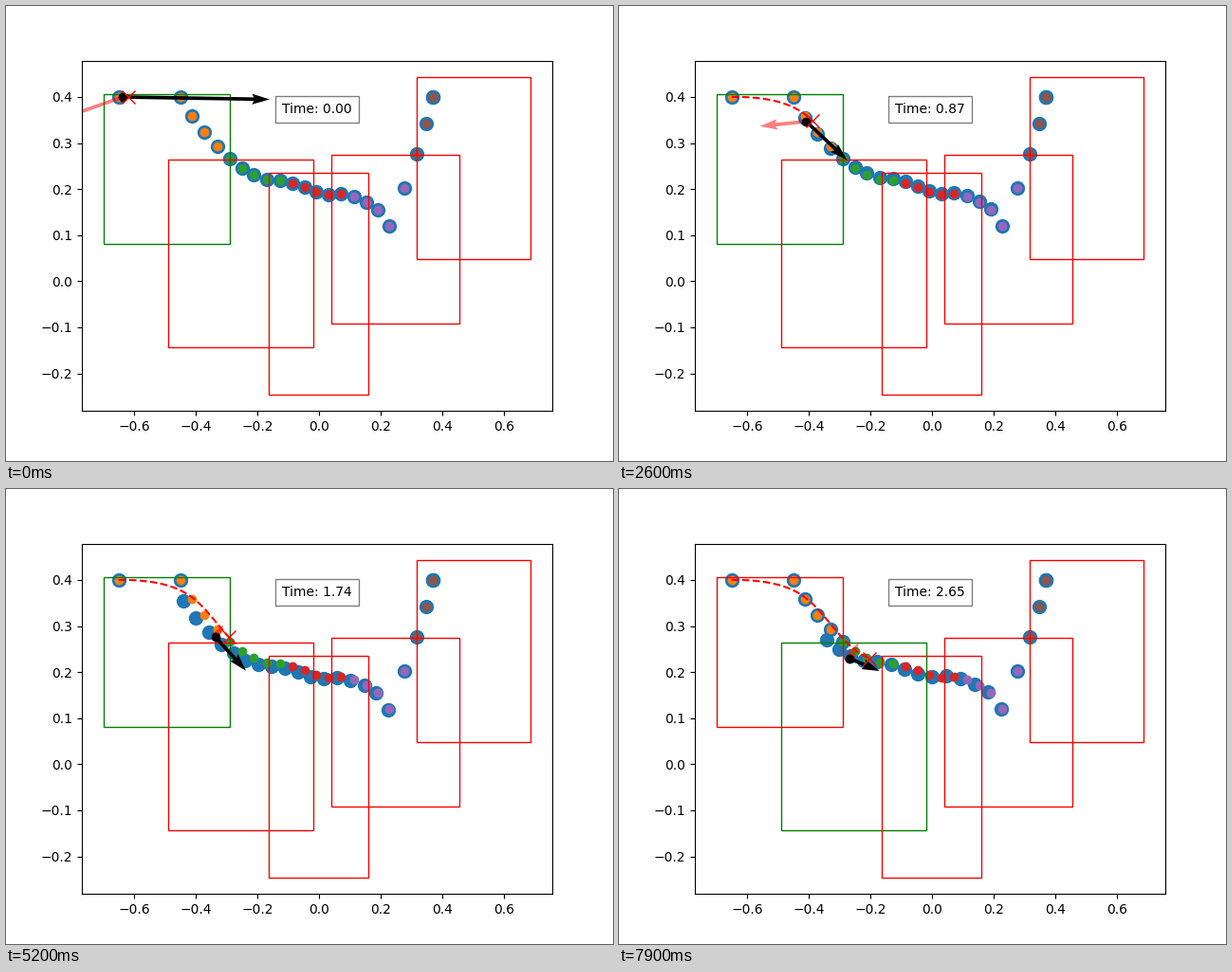
Recreate the animation shown at these times as a matplotlib script. Size 640 by 480 pixels, loop 8000 ms.

```python
import numpy as np
import matplotlib.pyplot as plt
from matplotlib.animation import FuncAnimation
from matplotlib.patches import Rectangle

FRAMES, STEP_MS = 80, 100
DT = 0.0335          # simulated seconds per frame
SWITCH_TIME = 2.0    # when the second region becomes active
ORIGIN = np.array([330.0, 290.36])
SCALE = np.array([324.9, -486.1])


def to_data(points):
    """Stage pixels to axes coordinates."""
    return (np.asarray(points, float) - ORIGIN) / SCALE


def smooth(t, keys, values):
    """Cubic curve through a few key points."""
    keys, values = np.array(keys, float), np.array(values, float)
    slopes = np.gradient(values, keys, axis=0, edge_order=2)
    i = np.clip(np.searchsorted(keys, t, side="right") - 1, 0, len(keys) - 2)
    h = (keys[i + 1] - keys[i])[:, None]
    u = (t - keys[i])[:, None] / h
    return ((1 + 2 * u) * (1 - u) ** 2 * values[i] + u * (1 - u) ** 2 * h * slopes[i]
            + u * u * (3 - 2 * u) * values[i + 1] + u * u * (u - 1) * h * slopes[i + 1])


# Waypoints: a start, a falling arm, a rising arm and a resting end
START, SECOND, END = (118.8, 95.93), (183.8, 95.93), (450.2, 95.93)
VALLEY = (404.3, 232.3)
falling = smooth(np.arange(1, 18), [1, 3, 5, 7, 10, 13, 14, 16, 17, 18],
                 [SECOND, (209.3, 133), (236, 161), (261.3, 178.3), (302.3, 186.8),
                  (340, 198.7), (353.3, 197.8), (380.3, 206.5), (392, 214.5), VALLEY])
rising = smooth(np.arange(18, 22), [18, 20, 22], [VALLEY, (433.3, 156.3), END])
waypoints = np.vstack([START, falling, rising, END, END, END])

# Motion in stage pixels
t = np.arange(FRAMES) * STEP_MS / 1000
velocity = np.column_stack([32 + 123 * np.exp(-(t / 1.29) ** 1.25),
                            2.5 + 39.5 * np.sin(np.pi * (t / 9) ** 0.7)])
steps = (velocity[1:] + velocity[:-1]) / 2 * DT
goal = np.array([129.5, 96]) + np.vstack([(0, 0), np.cumsum(steps, axis=0)])

drift = np.interp(t, [3.8, 5.2, 7.9], [0, 9, 17])
swing = np.interp(t, [1.6, 2.6, 4.0, 5.2], [0, -2, 5, 0])
lift = np.interp(t, [4.0, 5.2, 6.3, 7.9], [0, 2.5, 3, -2])
body = goal - np.column_stack([6.4 + 0.85 * drift, swing / 2])

FORCE_KEYS = [0, 2.6, 4.0, 6.3, 7.9]
force = np.column_stack([np.interp(t, FORCE_KEYS, [-171, -49, 0, 17, 10]),
                         np.interp(t, FORCE_KEYS, [60, 5, 0, -24, -17])])

body, goal, start = to_data(body), to_data(goal), to_data(START)
velocity, force = velocity / SCALE, force / SCALE


def plan(i, switched):
    """Waypoints pulled along by the body, less so further down the path."""
    index = np.arange(len(waypoints))
    fade = np.clip((19 - index) / 10, 0, 1) * (index > 1)
    bend = swing[i] * np.tanh((index - 5) / 1.2) + lift[i]
    points = waypoints + np.column_stack([-drift[i] * fade, bend * fade])
    if switched:
        points = np.vstack([waypoints[:6], points[5:]])
    return to_data(points)


fig, ax = plt.subplots(figsize=(6.4, 4.8), dpi=100)
ax.set_xlim(-0.7694, 0.7574)
ax.set_ylim(-0.28154, 0.47886)

plan_dots = ax.scatter(*plan(0, False).T, s=100, color="C0")
for k, group in enumerate(np.split(to_data(waypoints), 5)):
    ax.scatter(*group.T, s=36, color=f"C{k + 1}")

# left, top, right, bottom
REGIONS = [(103.5, 92.5, 236.5, 251.5), (171.5, 161.5, 324.5, 360.5),
           (277.5, 175.5, 382.5, 410.5), (343.5, 156.5, 478.5, 335.5),
           (433.5, 74.5, 553.5, 267.5)]
boxes = []
for left, top, right, bottom in REGIONS:
    corner = to_data((left, bottom))
    size = to_data((right, top)) - corner
    boxes.append(ax.add_patch(Rectangle(corner, *size, fill=False, edgecolor="r")))


def arrow(vector, **style):
    return ax.quiver(*body[0], *vector, angles="xy", scale_units="xy", scale=1, **style)


force_arrow = arrow(force[0], color="r", alpha=0.5)
velocity_arrow = arrow(velocity[0], color="k")
trail, = ax.plot([], [], "r--")
body_dot, = ax.plot([], [], "ko")
goal_mark, = ax.plot([], [], "rx", markersize=10)
label = ax.text(0.5, 0.85, "", transform=ax.transAxes, ha="center",
                bbox={"facecolor": "w", "alpha": 0.5, "pad": 5})


def update(i):
    now = i * DT
    switched = now >= SWITCH_TIME
    plan_dots.set_offsets(plan(i, switched))
    for k, box in enumerate(boxes):
        box.set_edgecolor("g" if k == int(switched) else "r")
    for quiver, vectors in ((force_arrow, force), (velocity_arrow, velocity)):
        quiver.set_offsets(body[i])
        quiver.set_UVC(*vectors[i])
    trail.set_data(*np.vstack([start, goal[:i + 1]]).T)
    body_dot.set_data(*body[i:i + 1].T)
    goal_mark.set_data(*goal[i:i + 1].T)
    label.set_text(f"Time: {now:.2f}")
    return []


anim = FuncAnimation(fig, update, frames=FRAMES, interval=STEP_MS, repeat=True,
                     repeat_delay=0, blit=False)
plt.show()
```
